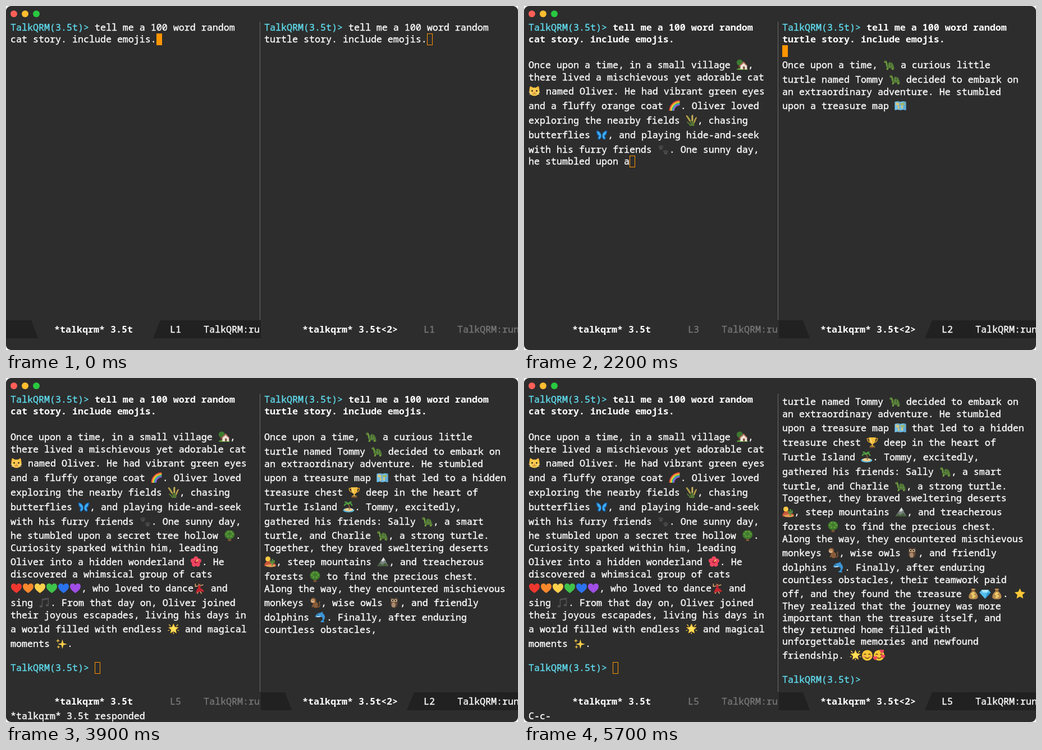
Recreate the animation shown at these times as an HTML page with a canvas. Size 912 by 614 pixels, loop 6000 ms.

```html
<!DOCTYPE html>
<html lang="en">
<head>
<meta charset="utf-8">
<title>Two chats</title>
<style>
html, body { margin: 0; width: 100%; height: 100%; overflow: hidden; background: #fff; }
canvas { display: block; }
</style>
</head>
<body>
<canvas id="stage" width="912" height="614"></canvas>
<script>
const ctx = document.getElementById('stage').getContext('2d');
const W = 912, H = 614, LOOP = 6000;
const TOP = 28, BAR = 561, ROW = 21, EMOJI_ROW = 25.9, EMOJI_W = 21;
const BG = '#2d2d2d', DARK = '#212121', WHITE = '#fff', GREY = '#777', CYAN = '#5fdcee', ORANGE = '#ff9500';
const BOT = 'TalkQRM', BUFFER = '*talkqrm* 3.5t', PROMPT = BOT + '(3.5t)>';
const EMOJI = /(\p{Extended_Pictographic})/u;

const catStory = `Once upon a time, in a small village 🏡,
there lived a mischievous yet adorable cat
🐱 named Oliver. He had vibrant green eyes
and a fluffy orange coat 🌈. Oliver loved
exploring the nearby fields 🌾, chasing
butterflies 🦋, and playing hide-and-seek
with his furry friends 🐾. One sunny day,
he stumbled upon a secret tree hollow 🌳.
Curiosity sparked within him, leading
Oliver into a hidden wonderland 🌺. He
discovered a whimsical group of cats
❤🧡💛💚💙💜, who loved to dance💃 and
sing 🎵. From that day on, Oliver joined
their joyous escapades, living his days in
a world filled with endless 🌟 and magical
moments ✨.`;

const turtleStory = `Once upon a time, 🐢 a curious little
turtle named Tommy 🐢 decided to embark on
an extraordinary adventure. He stumbled
upon a treasure map 🗺 that led to a hidden
treasure chest 🏆 deep in the heart of
Turtle Island 🏝. Tommy, excitedly,
gathered his friends: Sally 🐢, a smart
turtle, and Charlie 🐢, a strong turtle.
Together, they braved sweltering deserts
🏜, steep mountains ⛰, and treacherous
forests 🌳 to find the precious chest.
Along the way, they encountered mischievous
monkeys 🐒, wise owls 🦉, and friendly
dolphins 🐬. Finally, after enduring
countless obstacles, their teamwork paid
off, and they found the treasure 💰💎💰. ⭐
They realized that the journey was more
important than the treasure itself, and
they returned home filled with
unforgettable memories and newfound
friendship. 🌟😊🥰`;

// Emoji are drawn around (0, 0) in a box of about 20 units.
function dot(color, x, y, rx, ry = rx, turn = 0) {
  ctx.fillStyle = color;
  ctx.beginPath();
  ctx.ellipse(x, y, rx, ry, turn, 0, Math.PI * 2);
  ctx.fill();
}
function shape(color, path) {
  ctx.fillStyle = color;
  ctx.fill(new Path2D(path));
}
function line(color, width, path) {
  ctx.strokeStyle = color;
  ctx.lineWidth = width;
  ctx.stroke(new Path2D(path));
}
function star(color, x, y, outer, inner, points) {
  ctx.fillStyle = color;
  ctx.beginPath();
  for (let i = 0; i < points * 2; i++) {
    const r = i % 2 ? inner : outer, a = i * Math.PI / points - Math.PI / 2;
    ctx.lineTo(x + r * Math.cos(a), y + r * Math.sin(a));
  }
  ctx.fill();
}
function heart(color, x = 0, y = 0, size = 1) {
  ctx.save();
  ctx.translate(x, y);
  ctx.scale(size, size);
  shape(color, 'M0 9C-5 5-9.5 2-9.5-3C-9.5-9-2-10 0-5C2-10 9.5-9 9.5-3C9.5 2 5 5 0 9z');
  ctx.restore();
}
function mirrored(paint) {
  paint();
  ctx.scale(-1, 1);
  paint();
}
function paw(x, y) {
  const c = '#4b4b4b';
  dot(c, x, y + 1.5, 3, 2.5);
  for (let i = -1.5; i < 2; i++) dot(c, x + i * 2.2, y - 3 + Math.abs(i), 1.1, 1.6);
}
function face() {
  dot('#fdc936', 0, 0, 9.5);
  for (const s of [-1, 1]) {
    dot('#f4946a', s * 6, 2, 2.2, 1.6);
    line('#6b421b', 1.4, `M${s * 4 - 2}-1Q${s * 4}-4 ${s * 4 + 2}-1`);
  }
  line('#6b421b', 1.3, 'M-4 3Q0 8 4 3');
}

const art = {
  '🏡'() {
    dot('#3f7a30', -4, -4, 5.5, 5.5);
    shape('#70452d', 'M-6 0H-4V7H-6z');
    shape('#5c9a3a', 'M-9 7Q0 4 10 7V9H-9z');
    shape('#eee0d4', 'M-3 1L3-4L9 1V8H-3z');
    shape('#b8705f', 'M-5 2L3-6L10 2L9 3L3-3L-4 3z');
    shape('#70452d', 'M2 3H5V8H2z');
  },
  '🐱'() {
    shape('#f5b93d', 'M-9 1Q-9-8-7-9Q-5-8-2-6H2Q5-8 7-9Q9-8 9 1z');
    dot('#fdca4c', 0, 1, 9, 7.5);
    for (const s of [-1, 1]) {
      dot('#3a3020', s * 4, -.5, 1.3, 1.8);
      line('#fff0c0', .8, `M${s * 5} 3L${s * 10} 2M${s * 5} 5L${s * 9} 6`);
    }
    dot('#e87a7a', 0, 2.5, 1.3, 1);
    line('#7a5520', .9, 'M-3 4.5Q-1 6 0 4Q1 6 3 4.5');
  },
  '🌈'() {
    ['#f0453a', '#fb9a2e', '#fbe04a', '#56c454', '#3a9af0', '#a05bdc'].forEach((c, i) => {
      const r = 18 - i * 1.5;
      line(c, 1.7, `M${9 - r} 9A${r} ${r} 0 0 1 9 ${9 - r}`);
    });
  },
  '🌾'() {
    line('#5f8a36', 1.8, 'M0 10Q-1-2-8-8M2 10Q2 0 1-8M4 10Q4 0 8-4M-2 10Q-4 5-8 3');
    for (let i = 0; i < 4; i++) {
      dot('#b99a4a', -8 + i * 1.6, -7 + i * 2.5, 2.2, 1.3, .8);
      dot('#cfb25c', 1.5, -8 + i * 2.6, 2, 1.3, -.7);
      dot('#b99a4a', 8 - i, -4 + i * 2.4, 2, 1.2, -.8);
    }
  },
  '🦋'() {
    mirrored(() => {
      shape('#17528f', 'M0 0Q-4-9-10-8Q-10 0-6 2Q-9 6-6 9Q-2 9 0 3z');
      shape('#3aaaf5', 'M-1 0Q-4-7-8.5-6.5Q-8 0-4 1.500Q-7 5-5 7.500Q-2 7-1 3z');
    });
    line('#24303c', 1.5, 'M0-4V7');
  },
  '🐾'() { paw(-4.5, -3.5); paw(4, 5); },
  '🌳'() {
    shape('#7b5433', 'M-2 4H2L3 10H-3z');
    dot('#3f7a2c', 0, -1.5, 9, 8);
    for (let i = 0; i < 6; i++) dot('#5f9c3c', 5.5 * Math.cos(i * 1.05), -2.5 + 4.5 * Math.sin(i * 1.05), 1.8);
  },
  '🌺'() {
    for (let i = 0; i < 5; i++) {
      const a = i * Math.PI * .4 - 1.57;
      dot('#ee4560', 5.4 * Math.cos(a), 5.4 * Math.sin(a), 4.4, 4.2, a);
    }
    dot('#a91d3c', 0, 0, 2.6);
    line('#ffd75a', 1.6, 'M0 0L4-4');
  },
  '❤'() { heart('#f0372f'); },
  '🧡'() { heart('#f9882c'); },
  '💛'() { heart('#fcd04a'); },
  '💚'() { heart('#3fc24a'); },
  '💙'() { heart('#2a72ee'); },
  '💜'() { heart('#a04ee6'); },
  '💃'() {
    line('#d9a06a', 1.6, 'M-1-4L-7-3L-7-8M1-4L7-6M1 5L4 10M-1 5L-4 10');
    shape('#c3252f', 'M-2-5H2L2 0Q9 3 8 7Q2 4-6 9Q-5 2-2 0z');
    dot('#d9a06a', 0, -7, 2);
    dot('#4b2b1e', .5, -8, 2.3, 1.5);
  },
  '🎵'() {
    line('#515151', 1.6, 'M-4 6V-6L7-8V4');
    line('#515151', 2.2, 'M-4-5L7-7');
    dot('#515151', -6, 6.5, 2.8, 2);
    dot('#515151', 5, 4.5, 2.8, 2);
  },
  '🌟'() {
    star('#f5a623', 0, 0, 10, 4.5, 5);
    star('#ffdf58', 0, 0, 8.2, 4, 5);
    line('#ffd34d', 1.2, 'M-8-8L-5-5M8-8L5-5M0 9V6M-10 3L-7 2M10 3L7 2');
  },
  '✨'() {
    star('#fcd04a', 2, 1, 8.5, 2.6, 4);
    star('#fcd04a', -6, -5, 4, 1.2, 4);
    star('#fcd04a', -5, 6, 3.5, 1, 4);
  },
  '🐢'() {
    shape('#6d9a3f', 'M-9-6Q-7-9-5-7Q-3-5-3 1L8 4L10 7L8 6V9H5L4 6H-1L-2 9H-5L-4 5Q-6 2-6-3L-9-4z');
    shape('#466b33', 'M-4 4Q-3-5 2-5Q8-4 9 5Q2 7-4 4z');
    line('#7d9f4c', .9, 'M-2 2Q3 4 8 3M1-4L1 3M5-3L5 3');
    dot('#202a18', -6.8, -6, .8);
  },
  '🗺'() {
    shape('#75c3ea', 'M-10-7L-5-8L0-7L5-8L10-7V8L5 7L0 8L-5 7L-10 8z');
    shape('#5fabd6', 'M-5-8L0-7V8L-5 7zM5-8L10-7V8L5 7z');
    dot('#d9c57c', -5, -3, 3.5, 2.5, .3);
    dot('#d9c57c', -3, 3, 1.6, 3);
    dot('#9fb568', 4, -3, 4, 2.2);
    dot('#d9c57c', 3, 2, 1.8, 2.8);
  },
  '🏆'() {
    line('#d79b2a', 1.6, 'M-5-7H-9Q-9-1-4 0M5-7H9Q9-1 4 0');
    shape('#f3bd3c', 'M-6-9H6Q6 1 1 3V6H4V7H-4V6H-1V3Q-6 1-6-9z');
    shape('#74502f', 'M-5 7H5V10H-5z');
    line('#ffe390', 1.4, 'M-3-7Q-3-2-1 0');
  },
  '🏝'() {
    dot('#4fb6e6', 0, 6, 10, 3.8);
    dot('#eccf8e', 0, 5, 8, 3);
    line('#8c6238', 1.8, 'M1 5Q2-1-1-5');
    line('#4fa042', 2.2, 'M-1-5Q-6-7-8-2M-1-5Q5-8 6-2M-1-5Q-4-10-7-8M-1-5Q2-10 5-8');
  },
  '🏜'() {
    dot('#fbc944', -4, -5, 4.5);
    shape('#c8573a', 'M-10 4L-6-1H0L4 2L10 4V8H-10z');
    dot('#e59b52', 1, 7, 9, 2.6);
    line('#5a9440', 2.2, 'M4 7V-5M4 2H1V-2M4 1H7V-3');
  },
  '⛰'() {
    shape('#75807c', 'M-10 8L1-8L10 8z');
    shape('#dfe4e2', 'M1-8L5-1L2-3L0 1L-1-2L-4 0z');
    shape('#46603b', 'M-10 8L-5 3L-1 6L4 2L10 8z');
  },
  '🐒'() {
    line('#8a5c37', 1.5, 'M4 8Q10 8 8 2Q7-1 9-2');
    dot('#8a5c37', 1, 4, 4.5, 5.5);
    line('#8a5c37', 2.2, 'M-2 1L-5 8M2 8H-2');
    dot('#8a5c37', -3, -4, 5, 4.7);
    dot('#e0b183', -4, -3, 3.4, 3.2);
    dot('#332015', -5, -4, .7);
    dot('#332015', -2.5, -4, .7);
  },
  '🦉'() {
    dot('#604636', 0, 1, 6.5, 8.5);
    shape('#604636', 'M-6-3L-6-9L0-7L6-9L6-3z');
    dot('#a98a6e', -1, 4, 3.5, 4.5);
    for (const s of [-1, 1]) {
      dot('#ecd9b8', s * 2.8, -4, 2.5);
      dot('#2a1c14', s * 2.6, -4, 1.4);
    }
    shape('#eda73b', 'M-1-3H1L0 0z');
  },
  '🐬'() {
    shape('#3b94d3', 'M-10-1Q-7-8 0-8L3-10L4-7Q11-1 5 6L7 9L2 9L-1 8L3 5Q5 0 0-1Q-5 0-10-1z');
    shape('#b9def2', 'M-9-1Q-3-3 1-2L0-1Q-5 1-9-1z');
    dot('#18344a', -5, -4, .8);
  },
  '💰'() {
    shape('#b98a4e', 'M-4-9L4-9L2-5Q9 1 8 7Q7 10 0 10Q-7 10-8 7Q-9 1-2-5z');
    line('#79552d', 1.5, 'M-3-5H3');
    line('#f8dd72', 1.5, 'M3-1Q-3-2-3 1Q-2 2.500 0 2.500Q3 3 3 5Q2 7-3 6M0-3V8');
  },
  '💎'() {
    shape('#55bfec', 'M-6-7H6L10-2L0 9L-10-2z');
    shape('#a9e6fa', 'M-6-7H6L4-2H-4z');
    shape('#2f9bd4', 'M4-2H10L0 9z');
  },
  '⭐'() { star('#fdc735', 0, .5, 10, 4.8, 5); },
  '😊': face,
  '🥰'() {
    face();
    heart('#f0475a', -7, 5, .4);
    heart('#f0475a', 7, 2, .4);
    heart('#f0475a', 5, -7, .4);
  }
};

// Regular text gets a hairline outline for a medium weight.
function text(str, x, y, color = WHITE, weight = 400) {
  ctx.font = `${weight} 16.67px "Noto Sans Mono", monospace`;
  ctx.fillStyle = color;
  ctx.fillText(str, x, y);
  if (weight === 400) {
    ctx.strokeStyle = color;
    ctx.lineWidth = .35;
    ctx.strokeText(str, x, y);
  }
  return x + ctx.measureText(str).width;
}

// Draws one line and returns its right end.
function drawLine(str, x, top, tall, weight) {
  const base = Math.round(top) + (tall ? 20 : 16);
  if (str.startsWith(PROMPT)) {
    x = text(PROMPT, x, base, CYAN);
    str = str.slice(PROMPT.length);
  }
  for (const part of str.split(EMOJI)) {
    if (art[part]) {
      ctx.save();
      ctx.translate(x + EMOJI_W / 2, base - 6);
      art[part]();
      ctx.restore();
      x += EMOJI_W;
    } else if (part) x = text(part, x, base, WHITE, weight);
  }
  return x;
}

function drawCursor([x, top], solid) {
  x = Math.round(x);
  top = Math.round(top);
  if (solid) {
    ctx.fillStyle = ORANGE;
    ctx.fillRect(x, top, 10, ROW);
  } else {
    ctx.strokeStyle = ORANGE;
    ctx.lineWidth = 1;
    ctx.strokeRect(x + .5, top + .5, 9, ROW - 1);
  }
}

// Each key pairs a time with the words reached by then.
function pace(story, keys) {
  const chars = [...story];
  const steps = keys.map(([ms, words]) =>
    [ms, words ? [...story.slice(0, story.indexOf(words) + words.length)].length : 0]);
  return t => {
    if (t <= steps[0][0]) return '';
    let n = chars.length;
    const i = steps.findIndex(s => t <= s[0]);
    if (i > 0) {
      const [t0, n0] = steps[i - 1], [t1, n1] = steps[i];
      n = Math.round(n0 + (n1 - n0) * (t - t0) / (t1 - t0));
    }
    while (n < chars.length && /\w/.test(chars[n])) n++;
    return chars.slice(0, n).join('');
  };
}

const panes = [
  {
    x: 8, edge: 0, right: 454, clip: 452, name: BUFFER, nameX: 86,
    ask: [PROMPT + ' tell me a 100 word random', 'cat story. include emojis.'],
    sent: 200, begun: 1200, done: 3400, follow: true, skip: 0,
    typed: pace(catStory, [[1100], [1300, 'small village'], [2200, 'he stumbled upon a'],
      [3200, 'a world filled'], [3400, 'moments ✨.']])
  },
  {
    x: 460, edge: 452, right: W, clip: W, name: BUFFER + '<2>', nameX: 528,
    ask: [PROMPT + ' tell me a 100 word random', 'turtle story. include emojis.'],
    sent: 1000, begun: Infinity, done: 4700, follow: false, skip: 4,
    typed: pace(turtleStory, [[1600], [2200, 'treasure map 🗺'], [3200, 'mountains ⛰'],
      [3900, 'countless obstacles,'], [4400, 'treasure itself'], [4600, 'and newfound'], [4700, '🥰']])
  }
];

function drawPane(pane, t, active, cursorOn) {
  const sent = t >= pane.sent, done = t >= pane.done;
  let lines = [...pane.ask];
  if (sent) lines.push('');
  const story = pane.typed(t);
  if (story) lines.push(...story.split('\n'));
  if (done) lines.push('', PROMPT + ' ');
  const asked = done ? pane.ask.length - pane.skip : pane.ask.length;
  if (done) lines = lines.slice(pane.skip);

  ctx.save();
  ctx.beginPath();
  ctx.rect(pane.edge, TOP, pane.right - pane.edge, BAR - TOP);
  ctx.clip();
  let top = TOP, cursor;
  lines.forEach((str, i) => {
    const tall = EMOJI.test(str);
    const end = drawLine(str, pane.x, top, tall, sent && i < asked ? 700 : 400);
    if (pane.follow || done || i <= 2) cursor = [end, top + (tall ? 4 : 0)];
    top += tall ? EMOJI_ROW : ROW;
  });
  if (!active || cursorOn) drawCursor(cursor, active);
  ctx.restore();

  drawBar(pane, active, done ? 5 : t >= pane.begun ? 3 : sent ? 2 : 1);
}

function drawBar({ edge, right, clip, name, nameX }, active, lineNo) {
  const bottom = BAR + 32;
  if (active) {
    const start = edge && edge + 2;
    shape(DARK, `M${start} ${BAR}H${edge + 45}L${edge + 57} ${bottom}H${start}z`);
    shape(DARK, `M${edge + 275} ${BAR}H${right}V${bottom}H${edge + 262}z`);
  }
  const color = active ? WHITE : GREY;
  ctx.save();
  ctx.beginPath();
  ctx.rect(edge, BAR, clip - edge, 32);
  ctx.clip();
  text(name, nameX, 583, WHITE, 700);
  text('L' + lineNo, edge + 292, 583, color);
  text(BOT + ':run', edge + 352, 583, color);
  ctx.restore();
}

function draw(now) {
  const t = Math.floor(now % LOOP / 100) * 100;
  ctx.clearRect(0, 0, W, H);
  ctx.fillStyle = BG;
  ctx.beginPath();
  ctx.roundRect(0, 0, W, H, 9);
  ctx.fill();
  ['#ff5f57', '#febc2e', '#28c840'].forEach((c, i) => dot(c, 14 + i * 20, 14, 6));
  ctx.fillStyle = '#6c6c6c';
  ctx.fillRect(452, TOP, 1, 532);

  const focus = t < 500 ? 0 : 1;
  const cursorOn = t < 1000 || t % 1000 < 500;
  panes.forEach((pane, i) => drawPane(pane, t, i === focus, cursorOn));

  if (t >= 5700) text('C-c-', 8, 609);
  else if (t >= panes[0].done && t < 5600) text(BUFFER + ' responded', 8, 609);
}

function tick() {
  draw(performance.now());
  requestAnimationFrame(tick);
}
tick();
</script>
</body>
</html>
```
